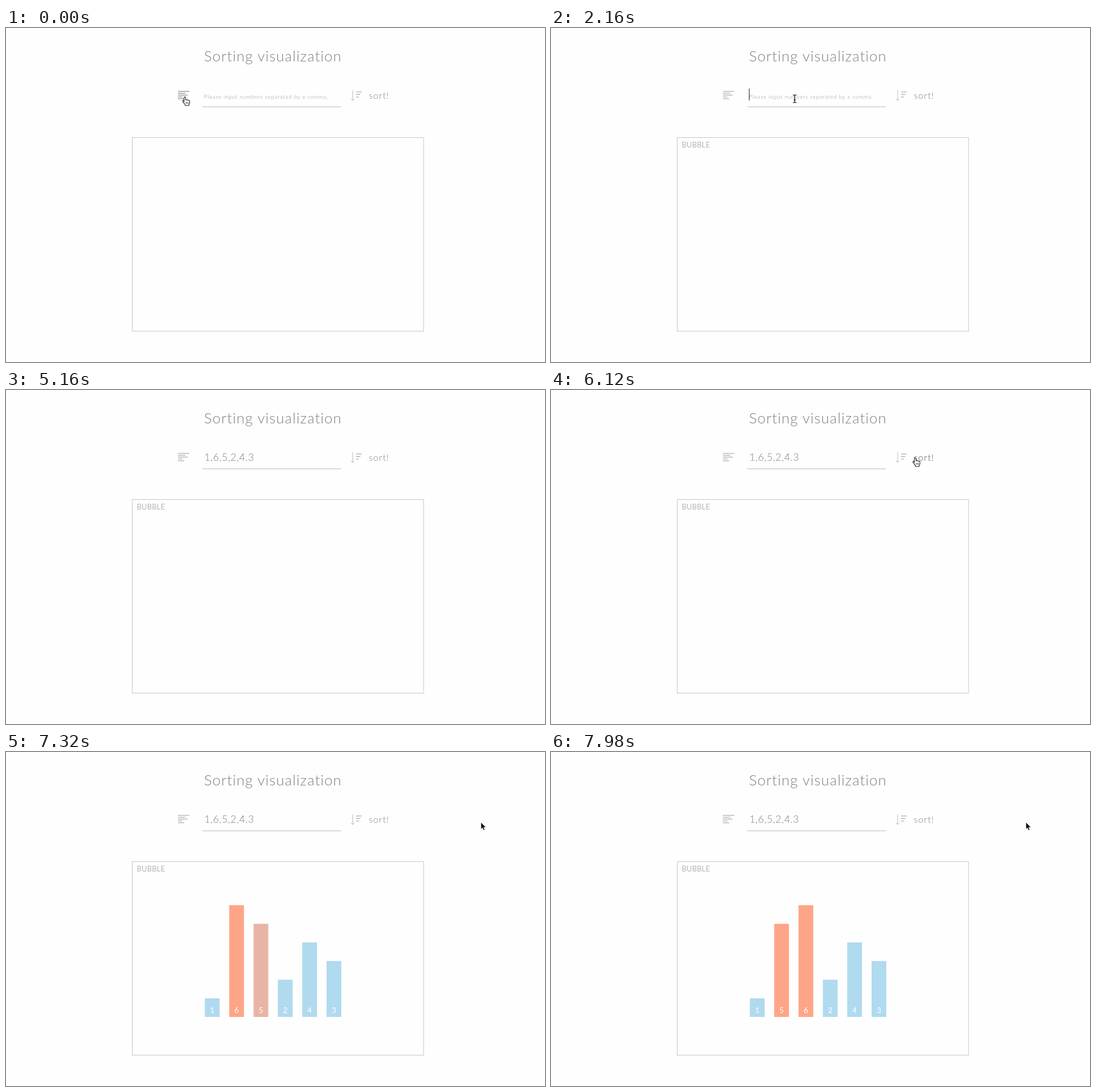
Recreate the animation shown at these times as an HTML page. Size 950 px wide and 590 px high, loop 8000 ms.

```html
<!DOCTYPE html>
<html lang="en">
<head>
<meta charset="utf-8">
<title>Sorting visualization</title>
<style>
html, body { margin: 0; width: 100%; height: 100%; overflow: hidden; background: #fefefe; }
svg { display: block; width: 950px; height: 590px; }
text { font-family: Lato, sans-serif; font-weight: 300; fill: #808080; white-space: pre; }
.thin { fill: none; stroke: #999; }
#bars text { fill: #fff; font-size: 14px; text-anchor: middle; font-weight: 400; }
</style>
</head>
<body>
<svg viewBox="0 0 950 590">
  <text x="349" y="59" font-size="26" letter-spacing="1">Sorting visualization</text>
  <path id="menu" class="thin" d="M303 112h20M303 115.3h13M303 118.5h17M303 121.8h8M303 125h11"/>
  <text id="hint" x="349" y="124.5" font-size="9.6" letter-spacing=".78" style="fill:#999">Please input numbers separated by a comma.</text>
  <text id="value" x="349.4" y="125" font-size="18" letter-spacing=".5"></text>
  <path id="caret" d="M0 107v21" stroke-width="1.2"/>
  <path d="M346 139.2h244.5" stroke="#b8b8b8"/>
  <path class="thin" d="M611 110v18M608 125l3 3.2l3-3.2" style="stroke:#bbb"/>
  <path class="thin" d="M617 113h10M617 117.5h7.5M617 122h5"/>
  <text id="sort" x="639.5" y="124.5" font-size="16" letter-spacing="1">sort!</text>
  <rect x="222.5" y="193.5" width="513.5" height="342" fill="none" stroke="#c6c6c6"/>
  <text id="label" x="230.5" y="211" font-size="13" letter-spacing=".3">BUBBLE</text>
  <g id="bars"></g>
  <g id="cursor">
    <g id="hand" stroke="#222" stroke-width="1.1" stroke-linejoin="round">
      <path fill="#fff" d="M-3.6 1.5V-6Q-3.4-7.4-2.2-7.4Q-.9-7.4-.8-6V-2Q.6-3.2 1.6-1.6Q3-2.7 4-1Q5.8-1.6 6.2.2V3.3Q5.8 5.2 4.8 6V8H-1.6V6.3Q-3.4 4.6-5 2.1Q-6.8-.2-5.7-1Q-4.6-1.5-3.6 0Z"/>
      <path fill="none" stroke-width=".8" d="M-.2 1.8v3M1.7 1.8v3M3.6 1.8v3"/>
    </g>
    <path id="arrow" fill="#111" stroke="#fff" stroke-width=".8" d="M-4-7V5.5L-1.2 3L.8 7.4L3 6.4L1.1 2.2H5Z"/>
    <path id="beam" fill="none" stroke="#222" stroke-width="1.3" d="M-3-6.8Q0-6.8 0-5Q0-6.8 3-6.8M0-5.5V5.5M-3 6.8Q0 6.8 0 5Q0 6.8 3 6.8M-1.8 2h3.6"/>
  </g>
</svg>
<script>
const LOOP = 8000, STEP = 60;
const $ = id => document.getElementById(id);
const clamp = v => Math.max(0, Math.min(1, v));
const ramp = (t, from, to) => clamp((t - from) / (to - from));
const ease = p => p < .5 ? 4 * p ** 3 : 1 - 4 * (1 - p) ** 3;
const mix = (a, b, p) => a + (b - a) * p;
const blend = (a, b, p) => `rgb(${a.map((v, i) => Math.round(mix(v, b[i], p)))})`;
const gray = v => `rgb(${v},${v},${v})`;
const show = (id, on) => $(id).style.display = on ? '' : 'none';

const BLUE = [176, 218, 239], ORANGE = [255, 165, 135];
const barX = i => 350.5 + i * 42.9;

// time, x, y, shape worn from that time on
const path = [
  [0, 317.5, 129, 'hand'], [180, 316.5, 128, 'hand'], [480, 316.5, 128, 'hand'],
  [780, 340, 150, 'arrow'], [1320, 408, 172, 'arrow'], [1440, 436, 192, 'arrow'],
  [1560, 436, 192, 'arrow'], [1860, 440, 112, 'beam'], [2160, 429.5, 125, 'beam'],
  [3060, 429.5, 125, ''], [5520, 429.5, 125, 'beam'], [5640, 470, 150, 'arrow'],
  [5820, 560, 163, 'arrow'], [6060, 644, 127, 'hand'], [6480, 644, 127, 'hand'],
  [6600, 670, 131, 'arrow'], [6840, 711.5, 133.5, 'arrow'], [6960, 765, 62, 'arrow'],
  [7140, 841, 131, 'arrow'], [LOOP, 841, 131, 'arrow']
];
const keys = [3060, 3240, 3420, 3540, 3720, 3780, 4080, 4200, 4380, 4500, 4680];
const typed = '1,6,5,2,4.3';

const bars = [1, 6, 5, 2, 4, 3].map((n, i) => {
  const h = n * 32.9;
  $('bars').insertAdjacentHTML('beforeend',
    `<g><rect y="${468 - h}" width="26" height="${h}"/><text x="13" y="461">${n}</text></g>`);
  const g = $('bars').lastChild;
  return { i, g, rect: g.firstChild };
});

function moveCursor(t) {
  const k = path.findLastIndex(p => p[0] <= t);
  const a = path[k], b = path[k + 1] || a, p = ramp(t, a[0], b[0]);
  $('cursor').setAttribute('transform', `translate(${mix(a[1], b[1], p)} ${mix(a[2], b[2], p)})`);
  for (const s of ['hand', 'arrow', 'beam']) show(s, s === a[3]);
}

function moveBars(t) {
  show('bars', t >= 6420);
  const swap = ease(ramp(t, 7440, 7980));
  const first = ramp(t, 6720, 6960);
  const heat = [first - ramp(t, 7050, 7290), first, ramp(t, 7150, 7390), 0, 0, 0];
  const shift = [0, swap, -swap, 0, 0, 0];
  for (const { i, g, rect } of bars) {
    g.setAttribute('transform', `translate(${barX(i + shift[i])} 0)`);
    rect.setAttribute('fill', blend(BLUE, ORANGE, heat[i]));
  }
}

function draw(t) {
  const count = keys.filter(k => k <= t).length;
  $('value').textContent = typed.slice(0, count);
  show('hint', !count);

  const caretOn = t >= 2100 && t < 2640 || t >= 3060 && t < 5160 || t >= 5640 && t < 6120;
  const end = count ? $('value').getComputedTextLength() : 0;
  show('caret', caretOn);
  $('caret').setAttribute('transform', `translate(${349.4 + end} 0)`);
  $('caret').setAttribute('stroke', count ? '#777' : '#444');

  $('label').style.opacity = ramp(t, 1560, 1860);
  $('menu').style.stroke = gray(mix(110, 153, ramp(t, 540, 900)));
  $('sort').style.fill = gray(mix(128, 85, ramp(t, 6000, 6120) - ramp(t, 6540, 7140)));
  moveBars(t);
  moveCursor(t);
}

function tick(now) {
  draw(Math.floor(now % LOOP / STEP) * STEP);
  requestAnimationFrame(tick);
}
tick(performance.now());
</script>
</body>
</html>
```
